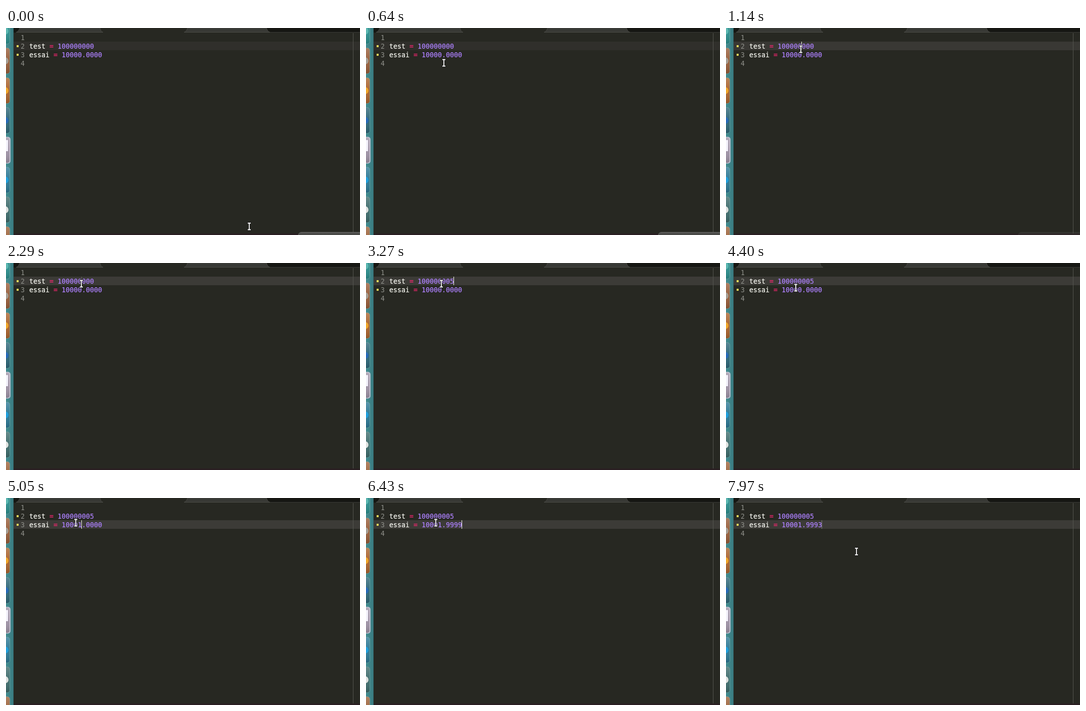
These frames come from a looping animation (700 by 410 pixels, 8 s). An HTML page:

```html
<!DOCTYPE html>
<html lang="en">
<head>
<meta charset="utf-8">
<title>Number stepping in an editor</title>
<style>
  html, body { margin: 0; width: 100%; height: 100%; overflow: hidden; background: #272822; }
  svg { display: block; }
  text {
    font: 13.29px "DejaVu Sans Mono", "Liberation Mono", monospace;
    fill: #f8f8f2; stroke: #f8f8f2; stroke-width: .2px; white-space: pre;
  }
  .gutter { fill: #8f908a; stroke: none; }
  .op { fill: #f92672; stroke: #f92672; }
  .num { fill: #ae81ff; stroke: #ae81ff; }
</style>
</head>
<body>
<svg width="700" height="410" viewBox="0 0 700 410">
  <defs>
    <linearGradient id="desk">
      <stop offset="0" stop-color="#438c90"/>
      <stop offset=".9" stop-color="#3b7d82"/>
      <stop offset="1" stop-color="#2f666a"/>
    </linearGradient>
    <linearGradient id="shine" x2="0" y2="1">
      <stop offset="0" stop-color="#fff" stop-opacity=".22"/>
      <stop offset=".5" stop-color="#fff" stop-opacity=".04"/>
      <stop offset="1" stop-color="#000" stop-opacity=".15"/>
    </linearGradient>
    <linearGradient id="sheet" x2="0" y2="1">
      <stop offset="0" stop-color="#5c5c5a"/>
      <stop offset="1" stop-color="#3c3c3a"/>
    </linearGradient>
  </defs>
  <rect width="700" height="410" fill="#272822"/>
  <rect id="band" x="15" width="685" height="17"/>

  <!-- tab strip -->
  <rect x="15" width="685" height="9" fill="#161713"/>
  <path d="M186 0Q187 8 193 9H351Q357 8 359 0Z" fill="#272822"/>
  <g fill="#383935" stroke="#4a4b46">
    <path d="M20 8.5Q25 7 27 0H186Q187 7 192 8.5Z"/>
    <path d="M352 8.5Q357 7 359 0H515Q517 7 522 8.5Z"/>
  </g>
  <path d="M522 8.5H700" stroke="#383935"/>
  <rect x="686" y="10" width="1" height="397" fill="#54554f"/>
  <rect x="15" y="407" width="685" height="3" fill="#2a1f22"/>
  <path id="popup" d="M578 410Q579 404.5 585 404.5H700V410Z" fill="url(#sheet)" stroke="#62625f"/>

  <rect width="15" height="410" fill="url(#desk)"/>
  <g id="dock"></g>

  <g fill="#e6db5a">
    <rect x="21" y="34" width="4" height="4"/>
    <rect x="21" y="51" width="4" height="4"/>
  </g>
  <g id="numbers"></g>
  <text x="46" y="41">test <tspan class="op">=</tspan> <tspan class="num" id="test"></tspan></text>
  <text x="46" y="58">essai <tspan class="op">=</tspan> <tspan class="num" id="essai"></tspan></text>
  <rect id="caret" width="1" height="17" fill="#f8f8f0"/>
  <g id="mouse" fill="none">
    <path d="M-3.5 -7H3.5M0 -7V7M-3.5 7H3.5" stroke="#111" stroke-width="3.4"/>
    <path d="M-3 -6.5H3M0 -6V6M-3 6.5H3" stroke="#fff" stroke-width="1.8"/>
  </g>
</svg>
<script>
const LOOP = 8000;
const $ = id => document.getElementById(id);
const clamp = (v, lo, hi) => Math.min(hi, Math.max(lo, v));

function add(parent, tag, attrs, text = "") {
  const el = document.createElementNS("http://www.w3.org/2000/svg", tag);
  for (const k in attrs) el.setAttribute(k, attrs[k]);
  el.textContent = text;
  parent.append(el);
}

for (let n = 1; n < 5; n++)
  add($("numbers"), "text", { x: 29, y: 7 + 17 * n, class: "gutter" }, n);

// tile and emblem colours
const tiles = [
  ["#2c8f8d", "#55b5ae"], ["#965c39", "#a29b90"], ["#a9632e", "#f0a21e"], ["#2c6577", "#1c62b4"],
  ["#9f93a6", "#f2f0fa"], ["#2c7894", "#159bdc"], ["#3d6b6b", "#dde0dd"], ["#9c623a", "#c79a70"]
];
tiles.forEach(([tile, emblem], i) => {
  const y = 59 * i - 20, lit = tile === "#9f93a6";
  const box = { x: -42, y: y + .5, width: 49.5, height: 51, rx: 5 };
  if (lit) add($("dock"), "rect", { ...box, width: 51, y: y - .5, height: 53, fill: "#d8cfe0", opacity: .7 });
  add($("dock"), "rect", { ...box, fill: tile });
  if (lit) add($("dock"), "rect", { x: -18, y: y + 6, width: 22, height: 22, fill: emblem });
  else add($("dock"), "circle", { cx: -2, cy: y + 26, r: 7, fill: emblem });
  add($("dock"), "rect", { ...box, fill: "url(#shine)", stroke: lit ? "#f0eaf4" : "#8ab0ac", "stroke-opacity": .5 });
});

// bursts of input: first press, gap between presses, number of presses
const run = (at, gap, n) => ({ at, gap, n });
const focusClick = run(1140, 0, 1);
const plusInt = run(2740, 132, 5);
const lineClick = run(4450, 200, 2);
const plusFloat = run(5050, 160, 2);
const arrowRight = run(5620, 160, 3);
const minusFrac = run(6430, 155, 7);
const runs = [focusClick, plusInt, lineClick, plusFloat, arrowRight, minusFrac];

const count = ({ at, gap, n }, t) =>
  t < at ? 0 : gap ? Math.min(n, Math.floor((t - at) / gap) + 1) : n;
const began = (r, t) => t >= r.at;

// mouse strokes: start, end, points passed at even intervals
const strokes = [
  [250, 900, [[481, 393], [660, 300], [360, 95], [154, 69], [137, 56], [145, 45]]],
  [990, 1210, [[145, 45], [149, 41]]],
  [3590, 4390, [[149, 41], [118, 17], [99, 36], [116, 61], [138, 49]]],
  [7790, 7940, [[138, 49], [190, 72], [258, 106]]]
];

// Catmull-Rom curve through the points, p from 0 to 1
function curve(pts, p) {
  const last = pts.length - 1;
  const i = Math.min(Math.floor(p * last), last - 1), u = p * last - i;
  const at = (k, axis) => pts[clamp(k, 0, last)][axis];
  return [0, 1].map(axis => {
    const [a, b, c, d] = [-1, 0, 1, 2].map(k => at(i + k, axis));
    return b + u * ((c - a) + u * ((2 * a - 5 * b + 4 * c - d) + u * (3 * (b - c) + d - a))) / 2;
  });
}

function mouseAt(t) {
  const [from, to, pts] = strokes.findLast(s => s[0] <= t) || strokes[0];
  return curve(pts, clamp((t - from) / (to - from), 0, 1)).map(Math.round);
}

// solid after input, then fading out and in again
function caretOpacity(t) {
  const active = runs.findLast(r => began(r, t));
  if (!active) return 0;
  const idle = t - active.at - active.gap * (count(active, t) - 1);
  const hold = 440, fade = 260, half = 700;
  const phase = (idle - hold) % (2 * half);
  if (idle < hold) return 1;
  return phase < half ? clamp(1 - phase / fade, 0, 1) : clamp((phase - half + 40) / fade, 0, 1);
}

function caretX(t) {
  if (!began(lineClick, t)) return began(plusInt, t) ? 173 : 149;
  if (!began(plusFloat, t)) return 133;
  return began(minusFrac, t) ? 189 : 149 + 8 * count(arrowRight, t);
}

function draw(t) {
  const step = Math.floor((t + 10) / 50) * 50 - 10;
  const focus = clamp((step - 990) / 200, 0, 1);
  const top = began(lineClick, t) ? 44 : 27;
  $("mouse").setAttribute("transform", `translate(${mouseAt(step)})`);
  $("band").setAttribute("y", top);
  $("band").setAttribute("fill", `rgb(${[48, 47, 43].map(v => Math.round(v + 12 * focus))})`);
  $("popup").setAttribute("opacity", 1 - focus);
  $("caret").setAttribute("x", caretX(t));
  $("caret").setAttribute("y", top);
  $("caret").setAttribute("opacity", caretOpacity(t));
  $("test").textContent = 1e8 + count(plusInt, t);
  $("essai").textContent = (1e4 + count(plusFloat, t) - count(minusFrac, t) / 1e4).toFixed(4);
}

const start = performance.now();
function tick() {
  draw((performance.now() - start) % LOOP);
  requestAnimationFrame(tick);
}
tick();
</script>
</body>
</html>
```
